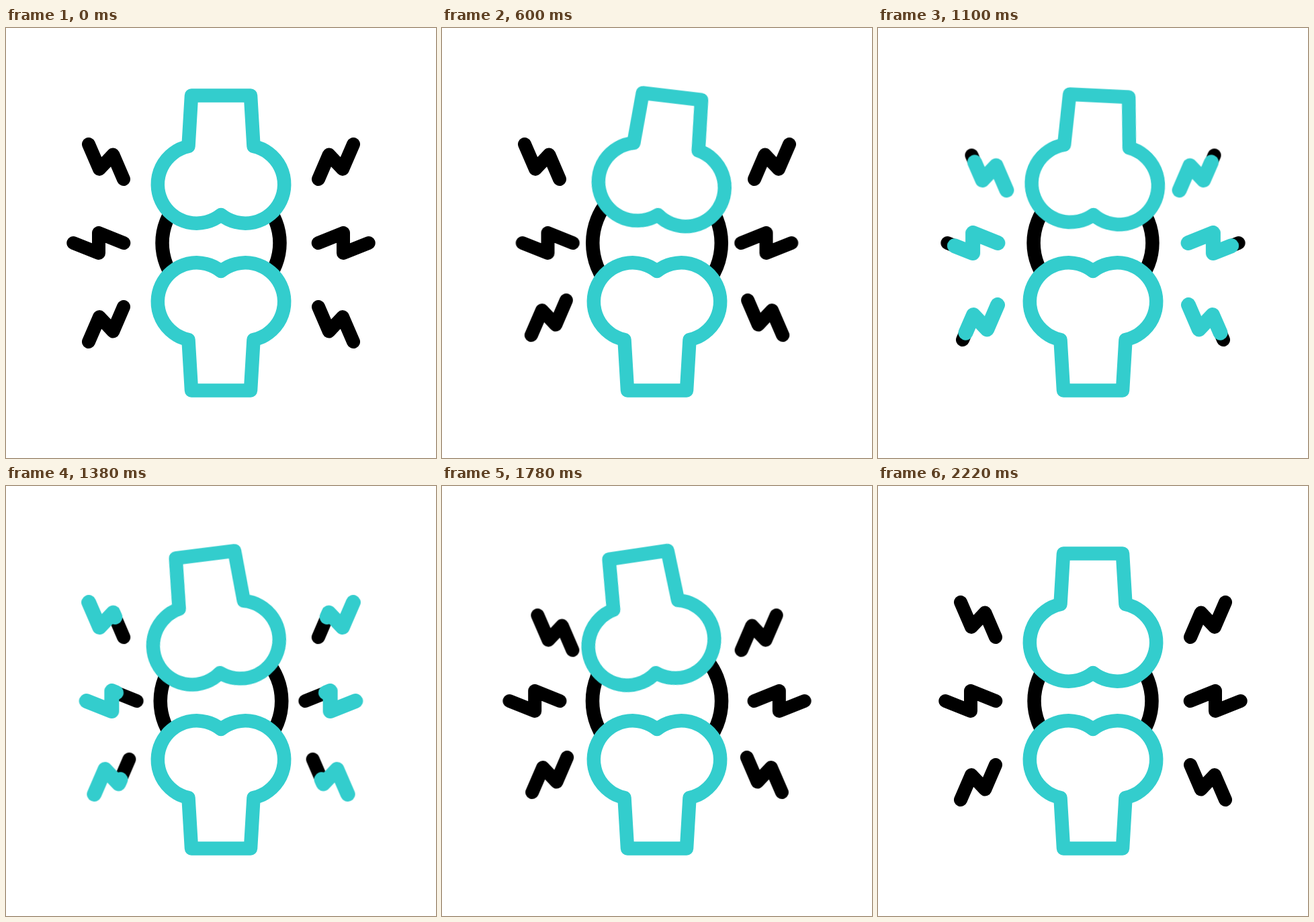
An HTML page that plays this animation: 640 by 640 pixels, repeating every 2400 ms.

```html
<!DOCTYPE html>
<html lang="en">
<head>
<meta charset="utf-8">
<title>Joint pain</title>
<style>
  html, body { margin: 0; width: 100%; height: 100%; overflow: hidden; background: #fff; }
  svg { display: block; width: 100%; height: 100%; }
  path, circle { fill: none; stroke: #000; stroke-width: 20.5; stroke-linecap: round; stroke-linejoin: round; }

  .anim { animation: 2400ms cubic-bezier(.3333, 0, .6667, 1) infinite; }
  .bone { fill: #fff; stroke: #33cdcd; }
  .swing { transform-origin: 320px 290px; animation-name: swing; }
  .disc { animation-name: swell; }
  .bolt { animation-name: nudge; }
  .bolt path { stroke-width: 20; }
  .bolt .flash {
    stroke: #33cdcd; stroke-width: 22;
    stroke-dasharray: 100 300; stroke-dashoffset: 100;
    visibility: hidden; animation-name: trace, show;
    animation-timing-function: cubic-bezier(.3333, 0, .6667, 1), step-end;
  }
  .mid { --dx: 19.5px; --dy: 0px; }
  .low { --dx: 19.5px; --dy: -19.5px; animation-delay: 200ms; }
  .top { --dx: 19.5px; --dy: 19.5px; animation-delay: 400ms; }

  @keyframes swing {
    0%, 8.3333% { transform: rotate(0deg); }
    33.3333% { transform: rotate(9.15deg); }
    66.6667% { transform: rotate(-10.85deg); }
    91.6667%, 100% { transform: rotate(0deg); }
  }
  @keyframes swell {
    0%, 8.3333%, 50%, 91.6667%, 100% { r: 87.5px; }
    29.1667%, 70.8333% { r: 96.7px; }
  }
  @keyframes nudge {
    0%, 8.3333%, 41.6667%, 75%, 100% { transform: translate(0px, 0px); }
    25%, 58.3333% { transform: translate(var(--dx), var(--dy)); }
  }
  @keyframes trace {
    0%, 29.1667% { stroke-dashoffset: 100; }
    50% { stroke-dashoffset: 0; }
    70.8333%, 100% { stroke-dashoffset: -100; }
  }
  @keyframes show {
    0% { visibility: hidden; }
    29.1667% { visibility: visible; }
    70.8333%, 100% { visibility: hidden; }
  }
</style>
</head>
<body>
<svg viewBox="0 0 640 640">
  <circle class="disc anim" cx="320" cy="320" r="87.5"/>
  <g id="left">
    <g class="bolt top anim"><path pathLength="100" d="M175 225 159.3 188.5 139 210 123 173"/></g>
    <g class="bolt mid anim"><path pathLength="100" d="M175.3 320 138 305 138 335 100.3 320"/></g>
    <g class="bolt low anim"><path pathLength="100" d="M175 415 159.3 451.5 139 430 123 467"/></g>
  </g>
  <path class="bone" d="M276 100.5H364L368.5 176A58 58 0 0 1 320 278A58 58 0 0 1 271.5 176Z"/>
  <path class="bone" d="M276 100.5H364L368.5 176A58 58 0 0 1 320 278A58 58 0 0 1 271.5 176Z"/>
</svg>
<script>
  const left = document.getElementById("left");

  for (const bolt of left.children) {
    const flash = bolt.firstElementChild.cloneNode();
    flash.setAttribute("class", "flash anim");
    bolt.append(flash);
  }

  const right = left.cloneNode(true);
  right.id = "right";
  right.setAttribute("transform", "matrix(-1 0 0 1 640 0)");
  left.after(right);

  // Each lobe is a large arc; the lower bone mirrors the upper one.
  const [upper, lower] = document.querySelectorAll(".bone");
  const shape = upper.getAttribute("d").replaceAll("0 0 1", "0 1 1");
  upper.setAttribute("d", shape);
  lower.setAttribute("d", shape);
  lower.setAttribute("transform", "matrix(1 0 0 -1 0 640)");
  upper.classList.add("swing", "anim");
</script>
</body>
</html>
```
